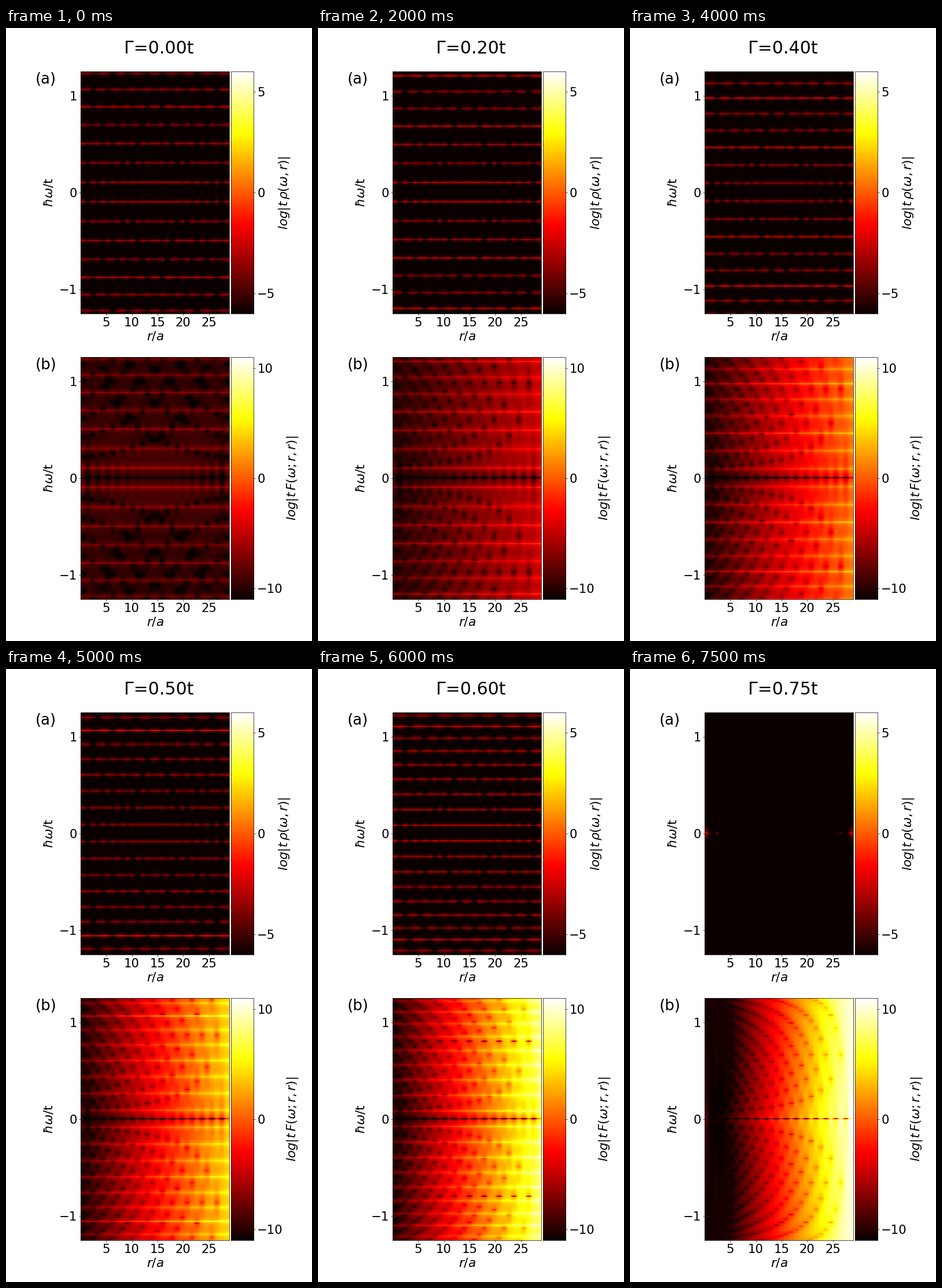
A matplotlib script for the animation above (8 s loop, 529 px wide and 1058 px high).

```python
import numpy as np
import matplotlib.pyplot as plt
from matplotlib.animation import FuncAnimation

WIDTH, HEIGHT, DPI = 529, 1058, 100
plt.rcParams.update({
    "font.family": "DejaVu Sans",
    "mathtext.fontset": "dejavusans",
    "axes.linewidth": 0.5,
})

# Non-reciprocal chain with a very weak p-wave pairing
SITES = 30
HOP = 1.0
PAIRING = 1e-10
BROADENING = 1e-7
OMEGA = -1.25 + 0.01 * np.arange(250)
GAMMAS = 0.05 * np.arange(16)


def spectra(gamma):
    """Return log10 of the local density and of the local pair amplitude."""
    right, left = HOP + gamma, HOP - gamma
    growth = np.sqrt(right / left)
    scale = growth ** (SITES - 1.5)
    site = np.arange(SITES)
    shift = np.eye(SITES, k=-1)

    # A similarity transform removes the exponential growth from the matrix
    hop = np.sqrt(right * left) * (shift + shift.T)
    pair = PAIRING * (shift - shift.T)
    weight = growth ** (site[:, None] + site[None, :]) / scale
    matrix = np.block([[hop, pair / weight], [pair.T * weight, -hop]])

    energy = (OMEGA + 1j * BROADENING)[:, None, None]
    green = np.linalg.inv(energy * np.eye(2 * SITES) - matrix)
    density = -green[:, site, site].imag / np.pi
    anomalous = green[:, site, SITES + site] * growth ** (2 * site) / scale
    return [np.log10(np.abs(v) + 1e-16) for v in (density, anomalous)]


fig = plt.figure(figsize=(WIDTH / 100, HEIGHT / 100), dpi=DPI, facecolor="white")


def points(px):
    return px * 72 / DPI


def label(x, y, text, size=21.7, **kwargs):
    kwargs.setdefault("ha", "center")
    kwargs.setdefault("va", "center")
    return fig.text(x / WIDTH, 1 - y / HEIGHT, text,
                    fontsize=points(size), **kwargs)


def make_axes(x0, y0, x1, y1):
    ax = fig.add_axes([x0 / WIDTH, 1 - y1 / HEIGHT,
                       (x1 - x0) / WIDTH, (y1 - y0) / HEIGHT])
    ax.tick_params(length=points(3.2), width=0.5, pad=points(3),
                   labelsize=points(21.2))
    return ax


def panel(top, name, limit, ticks, bar_label, bar_x):
    bottom = top + 418
    middle = (top + bottom) / 2

    ax = make_axes(129, top, 386, bottom)
    image = ax.imshow(np.zeros((len(OMEGA), SITES)), cmap="hot",
                      origin="lower", aspect="auto", interpolation="hanning",
                      extent=(0, SITES - 1, -1.25, 1.25),
                      vmin=-limit, vmax=limit)
    ax.set_xticks([5, 10, 15, 20, 25])
    ax.set_yticks([-1, 0, 1])

    bar = make_axes(389, top, 428, bottom)
    bar.imshow(np.linspace(-limit, limit, 256)[:, None], cmap="hot",
               origin="lower", aspect="auto", interpolation="nearest",
               extent=(0, 1, -limit, limit))
    bar.set_xticks([])
    bar.yaxis.tick_right()
    bar.set_yticks(ticks)

    label(50.5, top + 21, name, 26, ha="left", va="baseline")
    label(258, top + 457, "$r/a$")
    label(74.5, middle, r"$\hbar\omega$/t", rotation=90)
    label(bar_x, middle, bar_label, rotation=90)
    return image


title = label(264.5, 44.5, "", 30, va="baseline")
images = [
    panel(75, "(a)", 6, [-5, 0, 5], r"$log|t\,\rho(\omega,r)|$", 481),
    panel(568, "(b)", 11, [-10, 0, 10], r"$log|t\,F(\omega;r,r)|$", 495.5),
]
maps = [spectra(gamma) for gamma in GAMMAS]


def update(frame):
    title.set_text(f"Γ={GAMMAS[frame]:.2f}t")
    for image, data in zip(images, maps[frame]):
        image.set_data(data)
    return [title, *images]


animation = FuncAnimation(fig, update, frames=len(GAMMAS), interval=500,
                          repeat=True, repeat_delay=0, blit=False)
plt.show()
```
